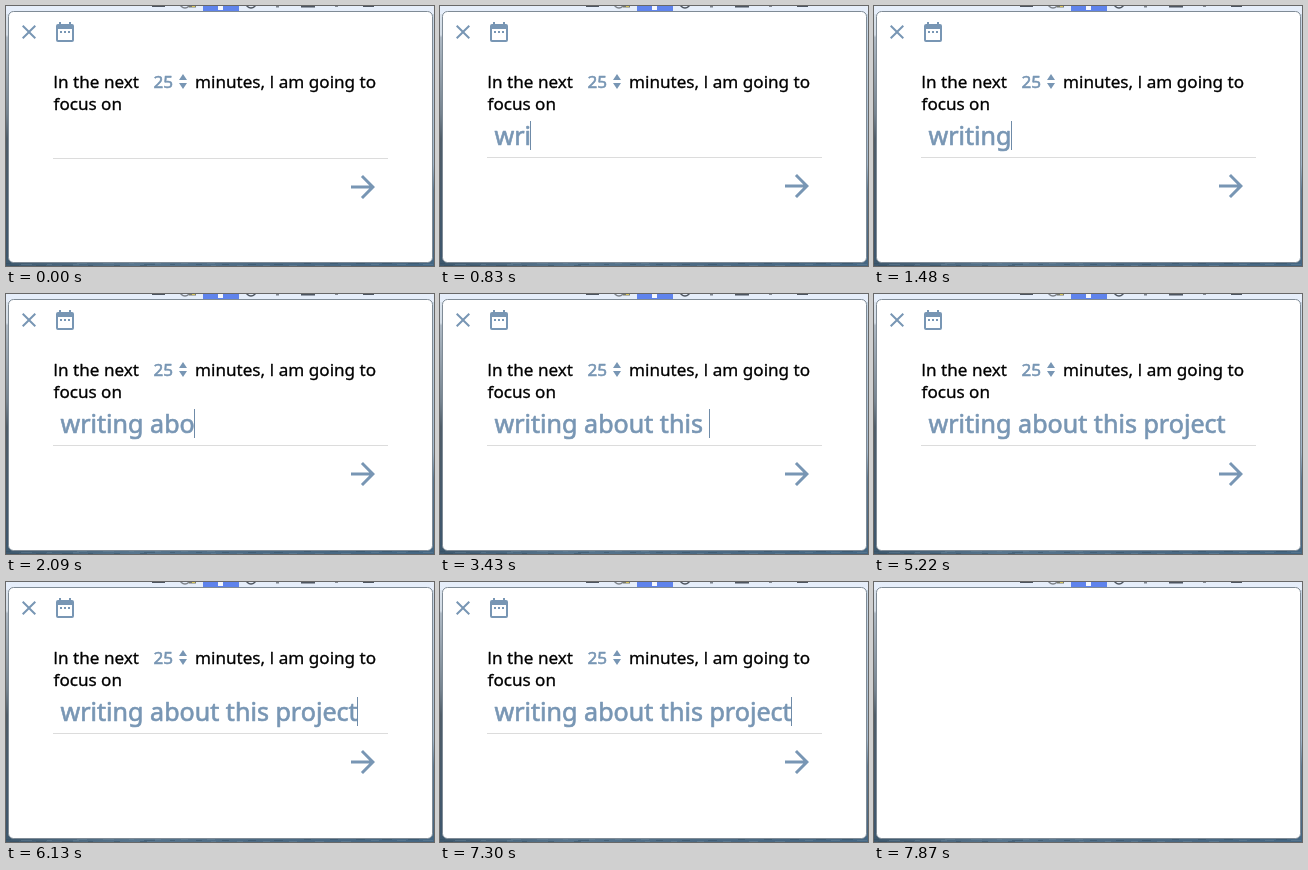
Write an HTML page with a canvas that moves like this. It is 428x260 px and loops after 7.91 s.

```html
<!DOCTYPE html>
<html lang="en">
<head>
<meta charset="utf-8">
<title>Focus timer</title>
<style>
html, body { margin: 0; width: 100%; height: 100%; overflow: hidden; background: #fff; }
canvas { display: block; width: 428px; height: 260px; }
</style>
</head>
<body>
<canvas id="stage"></canvas>
<script>
const W = 428, H = 260, LOOP = 7910;
const canvas = document.getElementById('stage');
const ratio = window.devicePixelRatio || 1;
canvas.width = W * ratio;
canvas.height = H * ratio;
const ctx = canvas.getContext('2d');
ctx.scale(ratio, ratio);

const BLUE = '#7896b4';
const FONT = '"Noto Sans", "Open Sans", sans-serif';
const PHRASE = 'writing about this project';
const TYPE_START = 300, KEY_TIME = 158;
const TYPE_END = TYPE_START + PHRASE.length * KEY_TIME;
const FOCUS = 200, BLINK = 600;
const CLICK = 7480, FADE = 7640, GONE = 7860;

const icons = {
  close: new Path2D('M19 6.4L17.6 5 12 10.6 6.4 5 5 6.4 10.6 12 5 17.6 6.4 19 12 13.4 17.6 19 19 17.6 13.4 12z'),
  date: new Path2D('M9 11H7v2h2zM13 11h-2v2h2zM17 11h-2v2h2zM19 4h-1V2h-2v2H8V2H6v2H5a2 2 0 0 0-2 2v14a2 2 0 0 0 2 2h14a2 2 0 0 0 2-2V6a2 2 0 0 0-2-2zM19 20H5V9h14z'),
  arrow: new Path2D('M12 4l-1.4 1.4L16.2 11H4v2h12.2l-5.6 5.6L12 20l8-8z'),
  spin: new Path2D('M0 6L4 0 8 6zM0 9H8L4 15z')
};

const clamp = v => Math.max(0, Math.min(1, v));

function rect(x, y, w, h, color) {
  ctx.fillStyle = color;
  ctx.fillRect(x, y, w, h);
}

function icon(name, x, y, scale = 1) {
  ctx.save();
  ctx.translate(x, y);
  ctx.scale(scale, scale);
  ctx.fillStyle = BLUE;
  ctx.fill(icons[name], 'evenodd');
  ctx.restore();
}

// A thin outline of the same colour gives the letters their weight
function text(str, x, y, size, color, bold, family = FONT) {
  ctx.font = `${size}px ${family}`;
  ctx.fillStyle = ctx.strokeStyle = color;
  ctx.lineWidth = bold;
  ctx.lineJoin = 'round';
  ctx.fillText(str, x, y);
  ctx.strokeText(str, x, y);
  return x + ctx.measureText(str).width;
}

function disc(x, y, r, color) {
  ctx.fillStyle = color;
  ctx.beginPath();
  ctx.arc(x, y, r, 0, Math.PI * 2);
  ctx.fill();
}

function ring(x, y, r, color) {
  ctx.strokeStyle = color;
  ctx.lineWidth = 1.5;
  ctx.beginPath();
  ctx.arc(x, y, r, 0, Math.PI * 2);
  ctx.stroke();
}

function menuBar() {
  rect(0, 0, W, 8, '#e6eefa');
  const ink = '#4d5560';
  rect(146, 0, 13, 1, ink);
  ring(179, -3, 5, '#7d838b');
  rect(183, 0, 7, 1.5, '#77796c');
  rect(186, 0, 3, 1, '#d9c65c');
  rect(197, 0, 36, 5, '#5f83ec');
  rect(212, 0, 5, 4, '#f4f7ff');
  ring(245, -3, 5, ink);
  rect(270, 0, 3, 1.5, '#7c838d');
  rect(295, 0, 14, 1.5, ink);
  rect(329, 0, 3, 1, '#858b94');
  rect(357, 0, 11, 1, ink);
}

function desktop() {
  rect(0, 0, W, H, '#e6eefa');
  const left = ctx.createLinearGradient(0, 6, 0, H);
  left.addColorStop(0, '#dce5ef');
  left.addColorStop(.09, '#d2dbe4');
  left.addColorStop(.1, '#aeb9c4');
  left.addColorStop(.4, '#75838f');
  left.addColorStop(.5, '#4f5d69');
  left.addColorStop(1, '#3d566d');
  rect(0, 6, 5, H, left);
  const right = ctx.createLinearGradient(0, 6, 0, H);
  right.addColorStop(0, '#c9d8e6');
  right.addColorStop(.6, '#9fb5c9');
  right.addColorStop(.7, '#5c7a94');
  right.addColorStop(1, '#46647f');
  rect(423, 6, 5, H, right);
  const sea = ctx.createLinearGradient(0, 0, W, 0);
  sea.addColorStop(0, '#3e586d');
  sea.addColorStop(.3, '#58768e');
  sea.addColorStop(.6, '#4c6a83');
  sea.addColorStop(1, '#456783');
  rect(0, 251, W, 9, sea);
  for (let i = 0; i < 36; i++) {
    rect((i * 67) % W, 257 + i % 3, 5 + i % 7, 1, i % 2 ? '#6e899d66' : '#2f495d66');
  }
  menuBar();
  ctx.beginPath();
  ctx.roundRect(2.5, 5.5, 424, 251, 5);
  ctx.fillStyle = '#fff';
  ctx.fill();
  ctx.strokeStyle = '#7f8b96';
  ctx.lineWidth = 1;
  ctx.stroke();
}

function sentence() {
  const size = 17.1, bold = .3;
  // Open Sans supplies the plain capital I
  const plain = '"Open Sans", sans-serif';
  let x = text('I', 47.3, 82, size, '#000', bold, plain);
  text('n the next', x, 82, size, '#000', bold);
  text('25', 147.5, 82, size, BLUE, .6);
  icon('spin', 173, 68);
  x = text('minutes, ', 189, 82, size, '#000', bold);
  x = text('I', x, 82, size, '#000', bold, plain);
  text(' am going to', x, 82, size, '#000', bold);
  text('focus on', 47.5, 104, size, '#000', bold);
}

function caretOn(t) {
  if (t < FOCUS || t >= CLICK) return false;
  return t < TYPE_END || Math.floor((t - TYPE_END) / BLINK) % 2 === 0;
}

function field(t) {
  const count = Math.max(0, Math.min(PHRASE.length, Math.floor((t - TYPE_START) / KEY_TIME)));
  const drop = count ? 0 : 1;
  const end = text(PHRASE.slice(0, count), 54.5, 138.5, 25.1, BLUE, .65);
  if (caretOn(t)) rect(Math.floor(end - .3), 115, 1, 29, '#6f8ba8');
  rect(47, 151 + drop, 335, 1, '#dcdcdc');
  if (t > CLICK) {
    const grow = 1 - (1 - clamp((t - CLICK) / 220)) ** 2;
    disc(357, 180, 25 * grow, 'rgba(123,152,181,.25)');
  }
  icon('arrow', 339, 162 + drop, 1.5);
}

function draw(t) {
  desktop();
  ctx.globalAlpha = 1 - clamp((t - FADE) / (GONE - FADE));
  if (ctx.globalAlpha > 0) {
    icon('close', 11, 14);
    icon('date', 47, 14);
    sentence();
    field(t);
  }
  ctx.globalAlpha = 1;
}

const start = performance.now();
function tick() {
  draw((performance.now() - start) % LOOP);
  requestAnimationFrame(tick);
}
tick();
</script>
</body>
</html>
```
